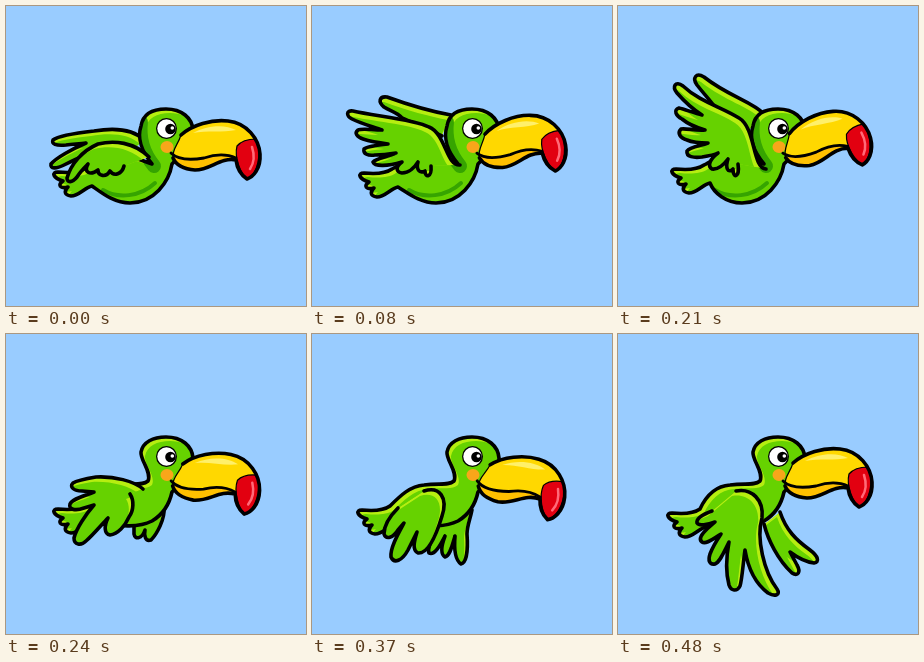
Write an HTML page with a canvas that moves like this. It is 300 px wide and 300 px high and loops after 0.56 s.

```html
<!DOCTYPE html>
<html lang="en">
<head>
<meta charset="utf-8">
<title>Flying bird</title>
<style>
html, body { margin: 0; width: 100%; height: 100%; overflow: hidden; background: #9cf; }
canvas { display: block; width: 300px; height: 300px; }
</style>
</head>
<body>
<canvas id="stage" width="300" height="300"></canvas>
<script>
const ctx = document.getElementById('stage').getContext('2d');
const STEP = 80;
const INK = '#000', GREEN = '#66d200', LIME = '#b6ee10', DARK = '#36a400';

const shape = d => new Path2D(d);

const head = 'C137 108 147 103 160 103C176 103 186 112 187 124C188 136 174 150 166 158';
const outlines = {
  glide: {
    neck: 'M146 158C136 146 131 132 135 120',
    belly: 'C163 176 148 197 124 197C108 197 96 187',
    back: 'C90 158 100 150 110 145Z'
  },
  flap: {
    neck: 'M142 147C146 138 134 126 135 118',
    belly: 'C163 172 156 181 146 187C128 196 104 190',
    back: 'C88 162 98 152 112 151C128 149 136 152 142 147Z'
  }
};

// One silhouette of head, belly and tail; the tail is moved by (x, y)
function bodyShape(kind, [x, y]) {
  const at = (...v) => v.map((n, i) => n + (i % 2 ? y : x)).join(' ');
  const { neck, belly, back } = outlines[kind];
  return shape(neck + head + belly + ' ' + at(86, 181)
    + 'C' + at(78, 183, 73, 191, 65, 191) + 'C' + at(58, 190, 58, 186, 62, 182)
    + 'C' + at(54, 184, 51, 180, 57, 176) + 'C' + at(47, 173, 45, 167, 52, 167)
    + 'C' + at(62, 168, 73, 168, 80, 163) + back);
}

const neckShade = shape('M135 116C133 132 138 148 148 160');
const bellyShade = shape('M97 184C112 193 134 191 149 177');

const beakEdge = 'M175 129C186 119 206 113 222 115C241 117 253 133 254 148C255 163 247 171 241 173C235 169 231 162 230 154C214 151 205 164 189 164C177 163 170 159 167 152';
const beakBase = 'C166 143 172 139 175 129';
const beak = shape(beakEdge + beakBase);
const beakOutline = shape(beakEdge);
const beakRoot = shape('M167 152' + beakBase);
const beakShade = shape('M167 150C185 156 208 148 230 150L230 154C214 151 205 164 189 164C177 163 170 159 167 150Z');
const beakGlow = shape('M187 127C201 119 219 118 230 124C217 127 200 124 187 127Z');
const beakTip = shape('M231 140C236 134 244 133 250 133C256 148 252 168 241 173C235 168 228 152 231 140Z');
const tipGlow = shape('M246 141C249 150 248 157 244 163');
const mouth = shape('M165 147C172 154 186 154 198 152C210 148 221 148 230 152');

// tilt: beak angle in degrees; tail: offset of the tail feathers
const poses = [
  {
    tilt: 0, tail: [0, -1], kind: 'glide',
    far: 'M138 134C126 122 106 122 88 125C70 127 52 130 47 134C45 138 50 140 60 139C68 138 74 138 80 137C66 143 50 152 45 158C44 163 50 163 58 159C64 156 72 152 78 150L110 158',
    near: 'M143 151C128 136 108 134 92 138C76 145 65 158 61 172C61 177 66 177 71 171C74 166 78 162 82 158C77 166 84 170 92 164C92 170 100 172 104 165C108 171 116 168 118 160'
  },
  {
    tilt: -6, tail: [0, 0], kind: 'glide',
    far: 'M139 109C122 106 97 99 75 91C67 90 66 96 72 101C78 105 85 106 90 112L130 130',
    near: 'M148 159C134 160 134 128 117 121C102 113 62 110 41 105C34 104 34 110 40 113C50 118 62 121 70 124C60 124 50 122 46 124C42 127 45 131 51 133C60 136 68 137 76 138C66 139 56 140 52 143C51 148 56 150 63 149C70 149 78 148 84 147C76 151 64 152 61 156C63 161 76 160 90 156C83 161 84 166 90 167C97 167 103 161 106 156C104 163 107 168 113 165C113 172 120 172 119 160'
  },
  {
    tilt: -10.5, tail: [6, -4], kind: 'glide',
    far: 'M146 108C135 96 110 90 86 71C78 66 74 72 79 79C86 88 92 94 96 100L130 125',
    near: 'M148 163C134 162 138 122 121 112C104 101 82 96 65 80C57 74 54 81 59 87C66 95 76 104 84 109C76 107 66 103 61 102C55 104 58 110 64 113C70 118 80 122 87 124C78 125 68 122 63 123C59 127 62 132 69 134C76 137 84 137 90 137C82 140 72 141 69 145C68 151 76 152 84 151C90 150 96 149 100 147C92 153 89 160 94 163C101 164 107 157 110 153C107 162 110 168 115 163C115 173 122 172 120 158'
  },
  {
    tilt: 5.5, tail: [0, 8], kind: 'flap',
    far: 'M158 174C159 185 151 200 145 206C139 208 138 201 139 196C136 205 129 206 128 200L128 176',
    near: 'M137 155C128 147 108 142 90 143C78 145 70 147 67 149C63 153 68 157 76 157L88 158C78 162 66 165 64 170C62 176 70 177 78 174L88 171C80 180 70 195 68 204C68 211 75 212 80 207C88 200 96 190 102 184C98 192 98 200 104 201C112 200 119 192 123 183C128 176 128 166 124 160'
  },
  {
    tilt: 10, tail: [-2, 9], kind: 'flap',
    far: 'M128 188C124 200 114 212 117 219C122 222 128 212 133 202C130 210 128 220 133 223C138 222 140 212 143 202C142 214 143 226 149 230C155 229 156 214 155 200C155 192 158 186 160 176L140 170',
    near: 'M112 157C128 152 136 164 130 182C124 202 116 220 106 219C100 216 102 208 105 198L96 216C90 227 82 230 79 223C78 214 86 200 92 189L86 196C81 204 74 206 72 200C72 192 78 182 86 174'
  },
  {
    tilt: 4.5, tail: [-2, 7], kind: 'flap',
    far: 'M134 182C130 200 126 222 129 231C134 235 139 226 141 212C144 224 156 240 166 242C172 240 170 232 166 224C160 210 158 196 158 183L150 165',
    near: 'M118 156C134 152 146 162 138 184C128 200 124 225 124 244C124 254 118 257 114 253C110 244 110 226 107 212C102 226 96 236 90 233C86 228 92 214 97 204C93 209 88 215 83 214C80 210 84 204 89 194C86 198 82 202 78 200C74 196 78 188 86 180'
  },
  {
    tilt: 0, tail: [2, 12], kind: 'flap',
    far: 'M146 190C150 206 160 226 174 239C180 243 183 238 179 231L172 218C180 224 188 228 196 229C202 228 200 222 192 216C178 206 168 196 162 178',
    near: 'M118 157C134 154 146 166 144 184C138 204 146 238 159 255C163 261 157 263 150 259C138 250 130 234 127 216C125 230 124 246 122 252C119 258 113 257 111 251C108 240 108 224 111 208C106 218 102 228 97 230C91 231 90 226 92 220C95 212 99 206 103 200C96 204 88 211 84 208C80 205 84 200 89 195L97 188C90 190 82 193 79 189C78 184 86 180 94 177'
  }
].map(p => ({
  ...p,
  far: shape(p.far),
  near: shape(p.near),
  body: bodyShape(p.kind, p.tail)
}));

function fill(path, color) {
  ctx.fillStyle = color;
  ctx.fill(path);
}

function line(path, width, color = INK) {
  ctx.lineWidth = width;
  ctx.strokeStyle = color;
  ctx.stroke(path);
}

function disc(x, y, rx, color, ry = rx) {
  ctx.beginPath();
  ctx.ellipse(x, y, rx, ry, 0, 0, Math.PI * 2);
  ctx.fillStyle = color;
  ctx.fill();
}

// Green part with a lime rim on the side away from (dx, dy)
function part(path, dx, dy, shade = () => {}) {
  ctx.save();
  ctx.clip(path);
  fill(path, LIME);
  ctx.translate(dx, dy);
  fill(path, GREEN);
  ctx.translate(-dx, -dy);
  shade();
  ctx.restore();
  line(path, 3.6);
}

function shadeGlide() {
  line(neckShade, 14, DARK);
  line(bellyShade, 4, DARK);
}

function drawBeak(tilt) {
  ctx.save();
  ctx.translate(166, 148);
  ctx.rotate(tilt * Math.PI / 180);
  ctx.translate(-166, -148);
  fill(beak, '#ffd800');
  fill(beakShade, '#ffc000');
  fill(beakGlow, '#fff06a');
  fill(beakTip, '#e20010');
  line(tipGlow, 2.5, '#ff6a78');
  line(beakTip, 1.2);
  line(beakRoot, 1.2);
  line(mouth, 2.8);
  line(beakOutline, 3.6);
  ctx.restore();
}

function drawFace() {
  disc(161, 141, 6.5, '#f9a61a', 6);
  disc(160.5, 122.5, 10.5, INK);
  disc(160.5, 122.5, 9.2, '#fff');
  disc(164.5, 123, 5.3, INK);
  disc(166.3, 122, 1.8, '#fff');
}

function draw(pose) {
  const glide = pose.kind === 'glide';
  ctx.fillStyle = '#99ccff';
  ctx.fillRect(0, 0, 300, 300);
  ctx.lineCap = ctx.lineJoin = 'round';

  part(pose.far, -3, 5);
  part(pose.body, 4, 4, glide ? shadeGlide : undefined);
  drawFace();
  part(pose.near, -4, 5);
  drawBeak(pose.tilt);
}

const start = performance.now();
function tick() {
  const t = Math.max(0, performance.now() - start);
  draw(poses[Math.floor(t / STEP) % poses.length]);
  requestAnimationFrame(tick);
}
tick();
</script>
</body>
</html>
```
